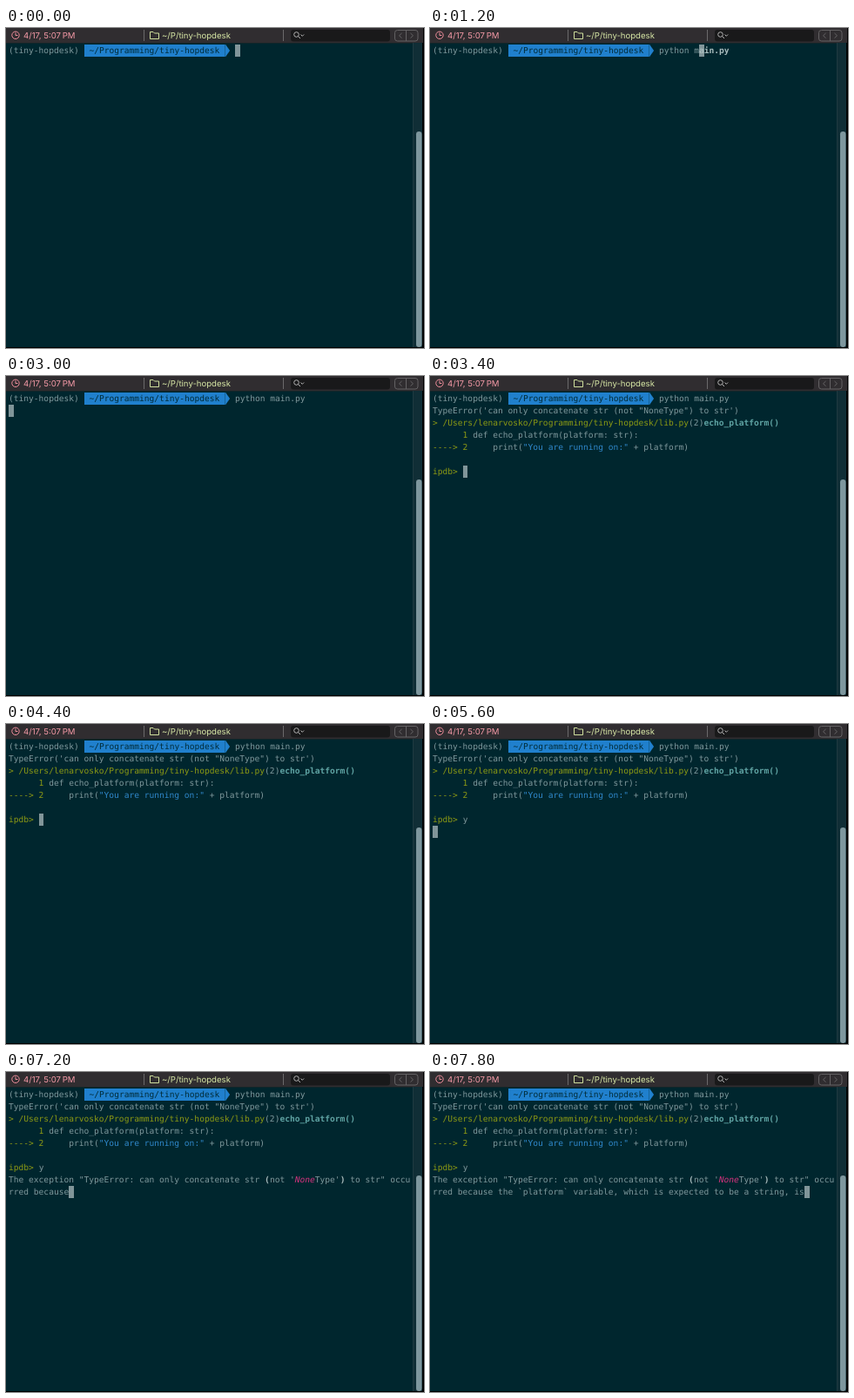
These frames come from a looping animation (480x368 px, 8000 ms). An HTML page:

```html
<!DOCTYPE html>
<html lang="en">
<head>
<meta charset="utf-8">
<title>Terminal session</title>
<style>
html, body { margin: 0; width: 100%; height: 100%; overflow: hidden; background: #000; }
#stage { position: relative; width: 480px; height: 368px; overflow: hidden; }
#chrome { position: absolute; inset: 0; }
#chrome text { font: 9.6px Inter, sans-serif; text-rendering: geometricPrecision; }

#term {
  --w: 5.775px;
  --h: 14px;
  position: absolute; left: 3px; top: 19px;
  font: calc(var(--w) / .602)/16px "DejaVu Sans Mono", monospace;
  text-rendering: geometricPrecision;
  white-space: pre;
  color: #7f989c;
  animation: run 8s step-end infinite;
}
.row, #cursor {
  position: absolute;
  left: calc(var(--col, 0) * var(--w));
  top: calc(var(--row, 0) * var(--h));
  height: var(--h);
}
.clip { overflow: hidden; }
b { color: #a9bcbd; }
.path { --col: 15; width: calc(28 * var(--w)); background: #2080cd; color: #002b38; }
.arrow { --col: 43; width: var(--w); background: #2080cd; clip-path: polygon(0 0, 15% 0, 100% 50%, 15% 100%, 0 100%); }
.green { color: #8c9a14; }
.blue { color: #2f88cb; }
.teal { color: #5fa3a3; font-weight: bold; }
.none { color: #d6337f; font-style: italic; }

#cursor { --col: var(--x); --row: var(--y); width: var(--w); height: 13.5px; background: #819599; }
#hint { --col: 45; opacity: var(--hint); }
#typed { --col: 45; width: calc(var(--keys) * var(--w)); background: #00262e; }
#error { opacity: var(--error); }
#trace { opacity: var(--trace); }
#reply { --row: 6; --col: 6; opacity: var(--reply); }
#said1 { --row: 7; width: clamp(0px, var(--said) * var(--w), 80 * var(--w)); }
#said2 { --row: 8; width: max(0px, (var(--said) - 80) * var(--w)); }

@keyframes run {
  0%    { --x: 45; --y: 0; --keys: 0; --hint: 0; --error: 0; --trace: 0; --reply: 0; --said: 0; }
  2.5%  { --x: 46; --keys: 1; --hint: 1; }
  5%    { --x: 47; --keys: 2; }
  7.5%  { --x: 49; --keys: 4; }
  10%   { --x: 51; --keys: 6; }
  12.5% { --x: 52; --keys: 7; }
  15%   { --x: 53; --keys: 8; }
  17.5% { --x: 54; --keys: 9; }
  20%   { --x: 56; --keys: 11; }
  22.5% { --x: 58; --keys: 13; }
  25%   { --x: 59; --keys: 14; --hint: 0; }
  30%   { --x: 0; --y: 1; }
  40%   { --x: 0; --y: 2; --error: 1; }
  42.5% { --x: 6; --y: 6; --trace: 1; }
  62.5% { --x: 7; --y: 6; --reply: 1; }
  70%   { --x: 0; --y: 7; }
  85%   { --x: 50; --y: 7; --said: 50; }
  87.5% { --x: 70; --y: 7; --said: 70; }
  90%   { --x: 12; --y: 8; --said: 92; }
  92.5% { --x: 37; --said: 117; }
  95%   { --x: 55; --said: 135; }
  97.5%, 100% { --x: 74; --y: 8; --keys: 14; --hint: 0; --error: 1; --trace: 1; --reply: 1; --said: 154; }
}
</style>
</head>
<body>
<div id="stage">
  <svg id="chrome" width="480" height="368" fill="none">
    <rect width="478" height="367" fill="#00262e"/>
    <rect width="479" height="17" fill="#302d30"/>
    <path d="M0 17.5H478" stroke="#122529"/>
    <rect x="467" y="17" width="11" height="350" fill="#102e36"/>
    <path d="M467.5 17V367" stroke="#203a41"/>
    <rect x="471" y="119" width="6.5" height="248" rx="3.2" fill="#7e979e"/>

    <g stroke="#ee8d9b">
      <circle cx="11" cy="8.3" r="4.2"/>
      <path d="M11 5.5V8.5H13.5"/>
    </g>
    <text x="20" y="12" fill="#f59aa7">4/17, 5:07&#8201;PM</text>
    <path d="M158.5 2V15M318.5 2V15" stroke="#6b696b"/>
    <path d="M165.5 12.5V4.5H169L170.5 6H175.5V12.5Z" stroke="#cfdf9d" stroke-linejoin="round"/>
    <text x="179" y="12" fill="#d8e8a6">~/P/tiny-hopdesk</text>

    <rect x="327" y="2" width="114" height="13.5" rx="3" fill="#19191a"/>
    <g stroke="#b5b5b5">
      <circle cx="333.5" cy="7.5" r="2.8"/>
      <path d="M335.5 9.5L338 12M338.5 7.5L340.3 9.3L342.1 7.5"/>
    </g>
    <g stroke="#646264">
      <rect x="446.5" y="2.5" width="26.5" height="12.5" rx="3"/>
      <path d="M459.5 2.5V15M454.5 6L451.5 8.8L454.5 11.6M464.5 6L467.5 8.8L464.5 11.6"/>
    </g>
  </svg>

  <div id="term">
    <div id="cursor"></div>
    <div class="row">(tiny-hopdesk)</div>
    <div class="row path"> ~/Programming/tiny-hopdesk </div>
    <div class="row arrow"></div>
    <div class="row" id="hint"><b>python main.py</b></div>
    <div class="row clip" id="typed">python main.py</div>

    <div class="row" id="error" style="--row:1">TypeError('can only concatenate str (not "NoneType") to str')</div>
    <div id="trace">
      <div class="row" style="--row:2"><span class="green">&gt; /Users/lenarvosko/Programming/tiny-hopdesk/lib.py</span>(2)<span class="teal">echo_platform()</span></div>
      <div class="row" style="--row:3"><span class="green">      1 </span>def echo_platform(platform: str):</div>
      <div class="row" style="--row:4"><span class="green">----&gt; 2 </span>    print(<span class="blue">"You are running on:"</span> + platform)</div>
      <div class="row green" style="--row:6">ipdb&gt; </div>
    </div>
    <div class="row" id="reply">y</div>
    <div class="row clip" id="said1">The exception "TypeError: can only concatenate str <b>(</b>not '<span class="none">None</span>Type'<b>)</b> to str" occu</div>
    <div class="row clip" id="said2">rred because the `platform` variable, which is expected to be a string, is</div>
  </div>
</div>
</body>
</html>
```
